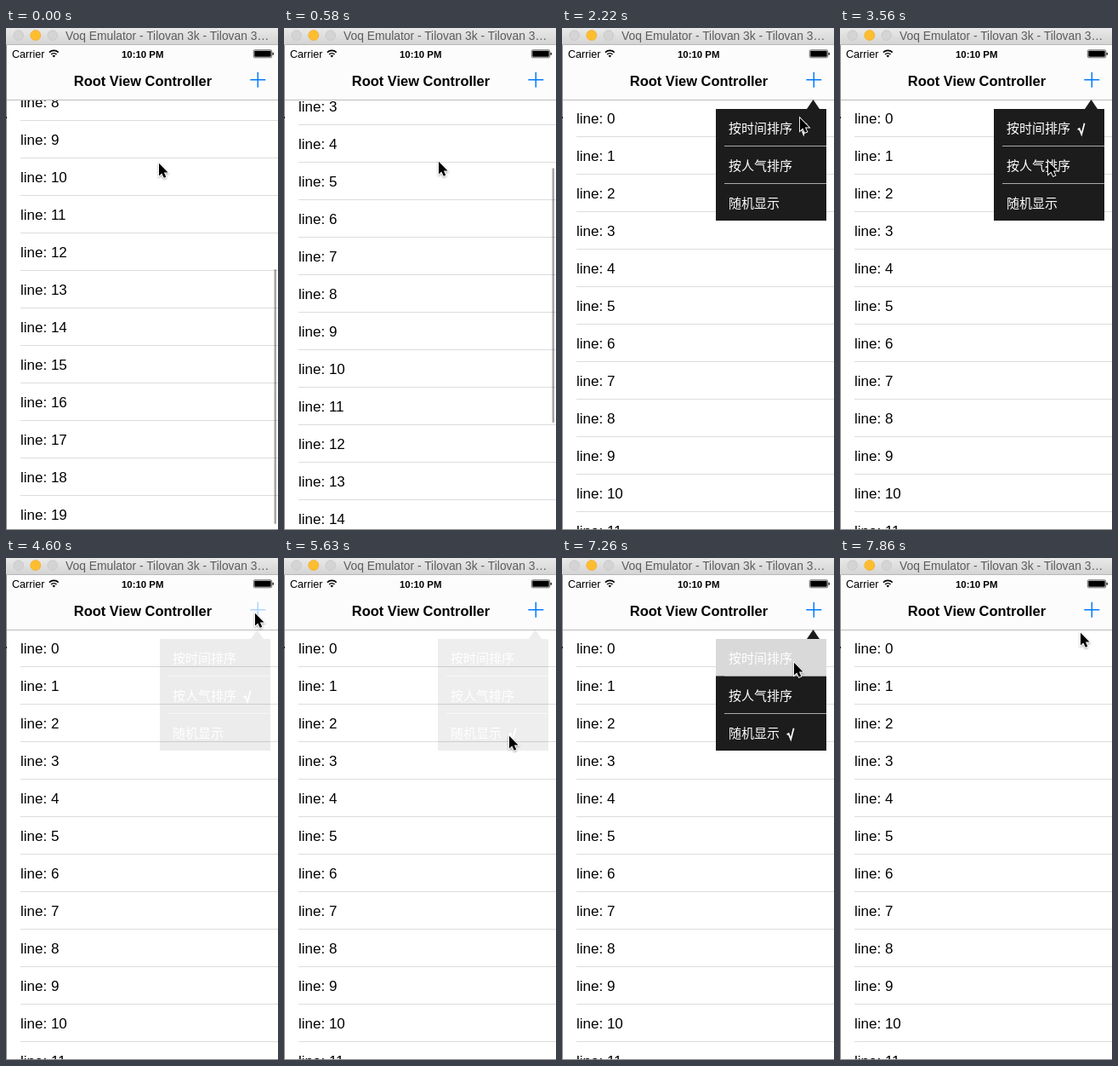
Write an HTML page that moves like this. It is 320 px wide and 589 px high and loops after 8 s.

```html
<!DOCTYPE html>
<html lang="zh-Hans">
<head>
<meta charset="utf-8">
<title>Sort menu</title>
<style>
html, body { margin: 0; width: 100%; height: 100%; overflow: hidden; background: #fff; }
svg { display: block; width: 100%; height: 100%; }
text { font-family: "Liberation Sans", Arial, sans-serif; }
.bold { font-weight: bold; text-anchor: middle; }
.menu text { font: 15px "Noto Sans CJK SC", "Noto Sans CJK", sans-serif; fill: #fff; }
#cursor { paint-order: stroke; filter: drop-shadow(0 1px 1px rgba(0, 0, 0, .35)); }
</style>
</head>
<body>
<svg viewBox="0 0 320 589" preserveAspectRatio="none">
  <defs>
    <linearGradient id="chrome" x2="0" y2="1">
      <stop offset="0" stop-color="#e9e9e9"/><stop offset="1" stop-color="#d3d3d3"/>
    </linearGradient>
    <clipPath id="view"><rect y="85" width="320" height="503"/></clipPath>
  </defs>
  <rect width="320" height="589" fill="#fff"/>

  <g clip-path="url(#view)"><g id="list" font-size="17"></g></g>
  <rect id="bar" x="315.5" width="2.5" height="299" rx="1.25" fill="#000" opacity=".35"/>

  <rect y="20" width="320" height="64" fill="#fcfcfc"/>
  <rect y="84" width="320" height="1" fill="#bcbcbe"/>
  <text x="7" y="35" font-size="12.6">Carrier</text>
  <g fill="none" stroke="#000" stroke-width="1.6">
    <path d="M50.9 28.6a7.6 7.6 0 0 1 10.8 0M53.1 31a4.6 4.6 0 0 1 6.4 0"/>
    <path d="M56.3 34.6l-1.8-1.9a2.6 2.6 0 0 1 3.6 0z" fill="#000" stroke="none"/>
  </g>
  <text class="bold" x="160.7" y="34.5" font-size="11.4">10:10 PM</text>
  <rect x="291.3" y="25.8" width="21.4" height="9" rx="1.5" fill="none" stroke="#000" stroke-width=".6"/>
  <rect x="292.3" y="26.8" width="19.4" height="7" rx=".8"/>
  <rect x="313.5" y="28.8" width="1.3" height="3" rx=".6"/>
  <text class="bold" x="161" y="68" font-size="16.45">Root View Controller</text>
  <path id="plus" d="M287.3 60.8h18M296.3 51.8v18" stroke="#007aff" stroke-width="1.5"/>

  <rect width="320" height="20" fill="url(#chrome)"/>
  <rect y="19" width="320" height="1" fill="#b8b8b8"/>
  <g stroke-width=".8">
    <circle cx="14.7" cy="8.6" r="5.8" fill="#d4d4d4" stroke="#c6c6c6"/>
    <circle cx="34.8" cy="8.6" r="6" fill="#fdbd2f" stroke="#eeb038"/>
    <circle cx="54.8" cy="8.6" r="5.8" fill="#d4d4d4" stroke="#c6c6c6"/>
  </g>
  <text x="70" y="14" font-size="13.85" fill="#5c5c5c">Voq Emulator - Tilovan 3k - Tilovan 3…</text>
  <rect y="20" width="1" height="569" fill="#8c8c8c"/>
  <rect y="104" width="1" height="2" fill="#111"/>
  <rect y="588" width="320" height="1" fill="#8c8c8c"/>

  <g id="menu" class="menu">
    <path d="M295.5 84l7.5 11h-15z" fill="#1c1c1c"/>
    <rect x="181" y="95" width="130" height="131" fill="#1c1c1c"/>
    <rect id="hit" x="181" width="130" height="43.5" fill="#d9d9d9"/>
    <path d="M191 138.5h120M191 182.5h120" stroke="#a9a9a9"/>
    <g id="items"></g>
    <path id="check" d="M.6 8.3l2-1.2 2.6 6.6L8.6.8" fill="none" stroke="#fff" stroke-width="1.7"/>
  </g>
  <path id="cursor" d="M0 .7V15.6l3.3-3.1 2.5 5.3 2.5-1.1-2.4-5.2h4.6z" stroke="#fff" stroke-width="1.8"/>
</svg>
<script>
const $ = id => document.getElementById(id);
const LOOP = 8000, STEPS = 54, ROW = 44;
const items = ["按时间排序", "按人气排序", "随机显示"];

// Tracks: [step, value...]
const path = [
  [0, 180, 158], [4, 182, 156], [8, 291, 69], [10, 293, 64], [13, 293, 65],
  [15, 280, 105], [18, 241, 154], [19, 239, 156], [22, 241, 156], [24, 245, 156],
  [26, 247, 156], [28, 290, 76], [30, 293, 64], [31, 293, 64], [32, 290, 88],
  [34, 265, 209], [35, 265, 208], [38, 265, 208], [40, 290, 75], [42, 303, 13],
  [43, 296, 50], [44, 294, 62], [46, 273, 122], [50, 273, 122], [53, 283, 87]
];
const presses = [[12, 25], [31, 36], [44, 49]];  // [menu opens, row picked]
const picks = [1, 2, 0];
const fadeIn = [.08, .8, 1], fadeOut = [1, .75, .07, 0];

function along(track, k) {
  const i = track.findIndex(p => p[0] >= k), b = track[i];
  if (b[0] === k) return b.slice(1);
  const a = track[i - 1], u = (k - a[0]) / (b[0] - a[0]);
  return a.slice(1).map((v, j) => v + (b[j + 1] - v) * u);
}

function menuState(k) {
  const s = { alpha: 0, hit: -1, checked: 0, plus: 1 };
  presses.forEach(([open, pick], i) => {
    if (k < open) return;
    s.plus = k === open ? .3 : 1;
    s.alpha = k < pick ? fadeIn[Math.min(k - open, 2)] : fadeOut[Math.min(k - pick, 3)];
    s.hit = k === pick ? picks[i] : -1;
    if (k > pick) s.checked = picks[i];
  });
  return s;
}

function draw(t) {
  const k = Math.min(STEPS - 1, Math.floor((t + 20) * STEPS / LOOP));
  const u = Math.min(1, k / 7), rest = 1 - u * u * (3 - 2 * u);
  $("list").setAttribute("transform", `translate(0 ${-371 * rest})`);
  $("bar").setAttribute("y", 87 + 196 * rest);
  $("bar").setAttribute("opacity", k < 9 ? .35 : k < 10 ? .15 : 0);

  const m = menuState(k);
  $("menu").setAttribute("opacity", m.alpha);
  $("plus").setAttribute("opacity", m.plus);
  $("hit").setAttribute("y", 95 + ROW * Math.max(m.hit, 0));
  $("hit").setAttribute("opacity", m.hit < 0 ? 0 : 1);
  const end = 204 + 15 * items[m.checked].length;
  $("check").setAttribute("transform", `translate(${end} ${111 + ROW * m.checked})`);
  $("cursor").setAttribute("transform", `translate(${along(path, k).map(Math.round)})`);
}

$("list").innerHTML = Array.from({ length: 20 }, (_, n) =>
  `<text x="17" y="${112 + ROW * n}">line: ${n}</text>
   <rect x="17" y="${127 + ROW * n}" width="303" height="1" fill="#dcdcde"/>`).join("");
$("items").innerHTML = items.map((s, n) =>
  `<text x="196" y="${123 + ROW * n}">${s}</text>`).join("");

const start = performance.now();
(function tick() {
  draw((performance.now() - start) % LOOP);
  requestAnimationFrame(tick);
})();
</script>
</body>
</html>
```
